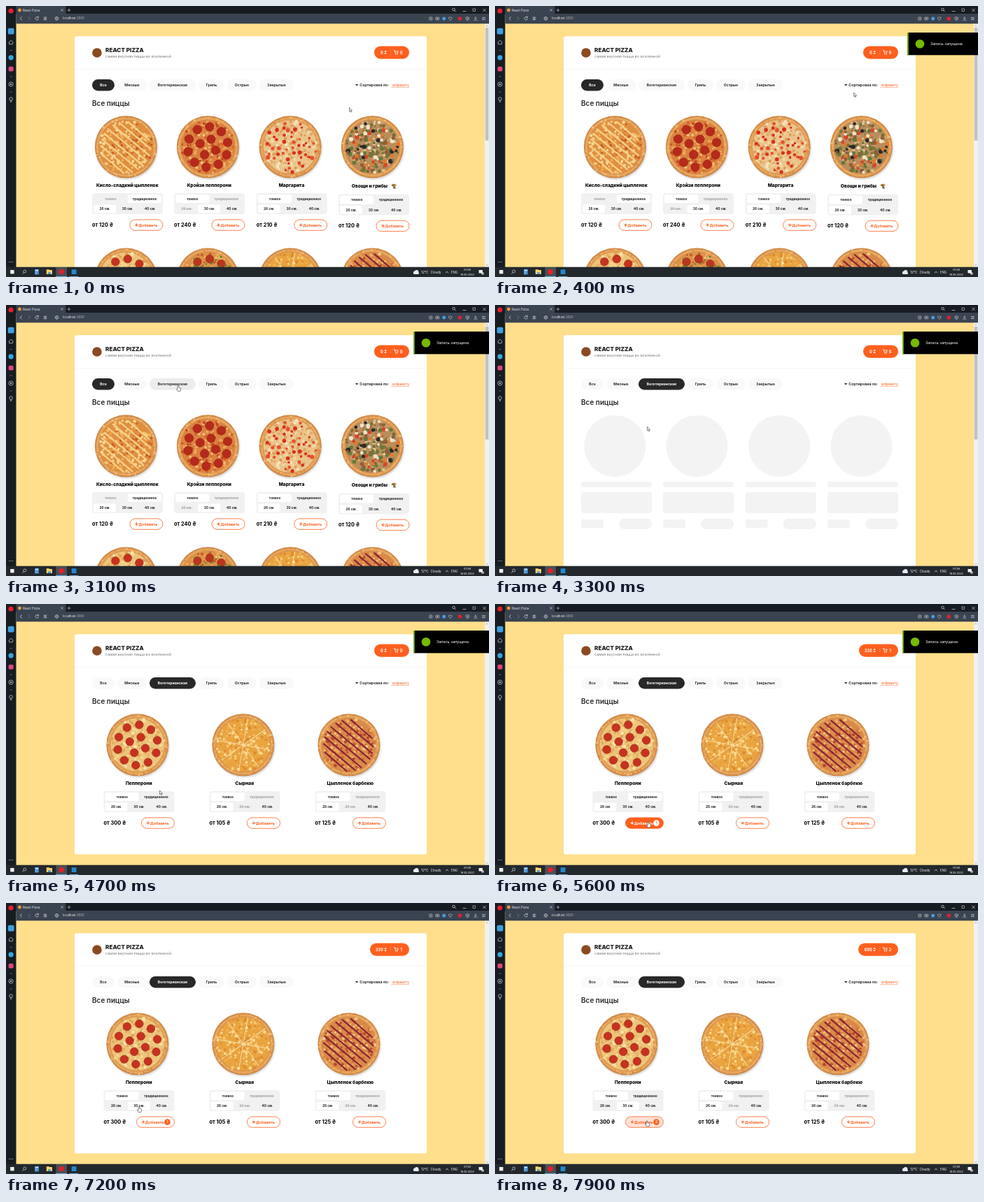
Recreate the animation shown at these times as an HTML page. Size 690 by 388 pixels, loop 8000 ms.

```html
<!DOCTYPE html>
<html lang="ru">
<head>
<meta charset="utf-8">
<title>React Pizza</title>
<style>
html, body { margin: 0; width: 100%; height: 100%; overflow: hidden; background: #ffdf8c; }
svg { display: block; width: 100vw; height: 100vh; }
text { font-family: Inter, "Open Sans", sans-serif; white-space: pre; }
</style>
</head>
<body>
<svg id="stage" viewBox="0 0 690 388">
  <defs>
    <radialGradient id="crust">
      <stop offset=".82" stop-color="#c9702c"/>
      <stop offset=".92" stop-color="#eaae66"/>
      <stop offset="1" stop-color="#c87a36"/>
    </radialGradient>
    <filter id="soft" x="-20%" y="-20%" width="140%" height="140%"><feGaussianBlur stdDeviation="1.6"/></filter>
  </defs>
  <rect width="690" height="388" fill="#ffdf8c"/>
  <g id="page"></g>
  <g id="chrome"></g>
  <g id="toast"></g>
  <g id="cursor" stroke="#222" stroke-width=".55" fill="#fff" stroke-linejoin="round">
    <path id="arrow" d="M0 0V5.6L1.3 4.5 2.2 6.5 3.1 6.1 2.2 4.1H4Z"/>
    <path id="hand" d="M-.8 .7Q0-.5 .8 .7V3L3.2 3.7Q4 4 3.8 5L3 8.4H-.6L-2.5 5.4Q-2.3 4.4-.8 5.3Z"/>
  </g>
</svg>
<script>
const LOOP = 8000, ORANGE = '#fe5f1e';
const $ = id => document.getElementById(id);

// ---- drawing helpers (text y is the optical middle) ----
const text = (s, x, y, size, weight = 700, fill = '#000', anchor = 'middle', extra = '') =>
  `<text x="${x}" y="${y + size * .36}" font-size="${size}" font-weight="${weight}" fill="${fill}" text-anchor="${anchor}" ${extra}>${s}</text>`;
const box = (x, y, w, h, r, fill, extra = '') =>
  `<rect x="${x}" y="${y}" width="${w}" height="${h}" rx="${r}" fill="${fill}" ${extra}/>`;
const dot = (x, y, r, fill, extra = '') => `<circle cx="${x}" cy="${y}" r="${r}" fill="${fill}" ${extra}/>`;
const line = (d, color, w = .8, extra = '') =>
  `<path d="${d}" fill="none" stroke="${color}" stroke-width="${w}" stroke-linecap="round" stroke-linejoin="round" ${extra}/>`;

function random(seed) {
  return () => (seed = (seed * 16807) % 2147483647) / 2147483647;
}

// ---- pizzas ----
const PIZZAS = {
  chicken: { base: '#e08f3e', flecks: ['#f3c476', '#c65e22', '#f0b052', '#f7d894'], stripes: '#f6d08c', angle: 38 },
  crazy: { base: '#dc8240', flecks: ['#f0bf78', '#c24a22', '#ecaa5c', '#d8602c'], salami: '#b52a1a', size: 6.3 },
  margarita: { base: '#eac48a', flecks: ['#f6e4bd', '#dd9a55', '#f2d5a0', '#e0a468'], bits: ['#d8301c', '#e4512f'], size: 2.6, count: 48 },
  veggie: { base: '#b98d5c', flecks: ['#8d713a', '#e0c795', '#6f6b35', '#cfa468'], bits: ['#2c2a2b', '#d8452a', '#efe3cb', '#66793a', '#e5782e', '#8e5f3a'], size: 2.8, count: 95 },
  pepperoni: { base: '#ecc47a', flecks: ['#f8e4ae', '#dfa052', '#f4d78c', '#e2ac62'], salami: '#c6321f', size: 5.8 },
  greens: { base: '#dc9248', flecks: ['#efc376', '#c55a2c', '#73863a', '#edb063'], salami: '#b9361f', size: 5.8, bits: ['#577a2d'], count: 24 },
  cheese: { base: '#e9a33f', flecks: ['#f6cb76', '#dc8a30', '#f8d992', '#efb253'], slices: '#f8dfa6' },
  barbecue: { base: '#d98a48', flecks: ['#f0c684', '#b8452f', '#e9aa60', '#cf6a38'], stripes: '#8a2434', angle: 38 }
};

function pizza(kind, cx, cy) {
  const p = PIZZAS[kind], rnd = random(kind.length * 911 + 17);
  const scatter = (n, inner, outer, size, colors) => Array.from({ length: n }, (_, i) => {
    const r = Math.sqrt(inner * inner + (outer * outer - inner * inner) * (i + .5) / n), a = i * 2.4 + rnd() * .6;
    return dot((Math.cos(a) * r).toFixed(1), (Math.sin(a) * r).toFixed(1),
      (size * (.6 + rnd() * .6)).toFixed(1), colors[Math.floor(rnd() * colors.length)]);
  }).join('');
  let s = dot(1.2, 2.2, 44, '#0003', 'filter="url(#soft)"') + dot(0, 0, 44.5, 'url(#crust)') +
    scatter(50, 40, 43, 1.4, ['#f0bd7c', '#d88c44', '#e6a45a']) + dot(0, 0, 38.5, p.base) +
    scatter(150, 0, 38, 2, p.flecks);
  if (p.salami) {
    for (let i = 0; i < 14; i++) {
      const inner = i < 4, a = (inner ? i / 4 : (i - 4) / 10) * Math.PI * 2 + .4, r = inner ? 12 : 29;
      s += dot((Math.cos(a) * r).toFixed(1), (Math.sin(a) * r).toFixed(1), p.size, p.salami, 'stroke="#9c2817" stroke-width=".6"');
    }
  }
  if (p.bits) s += scatter(p.count, 0, 37, p.salami ? 1.6 : p.size, p.bits);
  if (p.stripes) {
    let d = '';
    for (let y = -30; y <= 30; y += 8.5) {
      const half = Math.sqrt(36 * 36 - y * y);
      d += `M${-half} ${y}L${half} ${y + 2}`;
    }
    s += line(d, p.stripes, 2.2, `transform="rotate(${p.angle})"`);
  }
  if (p.slices) {
    for (let a = 10; a < 180; a += 45) s += line('M-38 0H38', p.slices, 1, `transform="rotate(${a})"`);
  }
  return `<g transform="translate(${cx} ${cy})">${s}</g>`;
}

// ---- product cards; option codes: a = active, n = normal, d = disabled ----
function options(labels, codes, x, y, step, size) {
  return labels.map((label, i) => {
    const cx = x + 2 + step * (i + .5), code = codes[i];
    return (code === 'a' ? box(x + 2 + i * step, y - 6, step - .5, 12, 2.5, '#fff') : '') +
      text(label, cx, y, size, 650, code === 'd' ? '#aaa' : '#222', 'middle', code === 'd' ? 'text-decoration="line-through"' : '');
  }).join('');
}

function addButton(right, y, count, look) {
  const w = count ? 54 : 47, x = right - w, full = look === 'full';
  const ink = full ? '#fff' : ORANGE;
  const fill = full ? ORANGE : look === 'fading' ? '#ffe2d6' : '#fff';
  return box(x, y - 7.7, w, 15.4, 7.7, fill, `stroke="${ORANGE}" stroke-width=".8"`) +
    line(`M${x + 7.5} ${y}h4M${x + 9.5} ${y - 2}v4`, ink, 1) +
    text('Добавить', x + 12.6, y, 5.4, 650, ink, 'start') +
    (count ? dot(right - 10, y, 4.3, full ? '#fff' : ORANGE) + text(count, right - 10, y, 4.8, 650, full ? ORANGE : '#fff') : '');
}

function card(x, title, kind, price, types, sizes, { dy = 0, count = 0, look = '' } = {}) {
  return pizza(kind, x + 48.4, 201.8) +
    text(title, x + 50.3, 256.6 + dy, 6.6, 800) +
    box(x, 268 + dy * 1.5, 101, 30, 4, '#f1f1f1') +
    options(['тонкое', 'традиционное'], types, x, 276 + dy * 1.5, 48.7, 4.7) +
    options(['26 см.', '30 см.', '40 см.'], sizes, x, 290.5 + dy * 1.5, 32.4, 4.8) +
    text(`от ${price} ₴`, x, 313.4 + dy * 1.3, 7.4, 700, '#000', 'start') +
    addButton(x + 101, 313.6 + dy * 1.3, count, look);
}

function skeleton(x) {
  const gray = '#f3f3f3';
  return dot(x + 48.4, 202, 44, gray) + box(x, 253, 101, 8, 3, gray) + box(x, 268, 101, 30, 4, gray) +
    box(x, 307, 32, 12, 3, gray) + box(x + 54, 305.5, 47, 15.6, 7.8, gray);
}

const mushroom = '<g transform="translate(554 258)"><path d="M-3.8-1.5Q-1-5 3.5-2.4L3 .2-1 0Z" fill="#c49a4a"/><path d="M-1 0L1.4 0 3 3.5-.4 3.4Z" fill="#6d6a35"/><path d="M-3-1L1-1.6" stroke="#43351c" stroke-width="1"/></g>';
const COLUMNS = [123, 240, 357.7, 475];

const SCENES = {
  all: () =>
    card(COLUMNS[0], 'Кисло-сладкий цыпленок', 'chicken', 120, 'da', 'ann') +
    card(COLUMNS[1], 'Крэйзи пепперони', 'crazy', 240, 'ad', 'dan') +
    card(COLUMNS[2], 'Маргарита', 'margarita', 210, 'an', 'ann') +
    card(COLUMNS[3], '', 'veggie', 120, 'an', 'ann', { dy: 1 }) +
    text('Овощи и грибы', 519.5, 257.8, 6.6, 800) + mushroom +
    ['pepperoni', 'greens', 'cheese', 'barbecue'].map((kind, i) => pizza(kind, COLUMNS[i] + 48.4, 391)).join(''),
  loading: () => COLUMNS.map(skeleton).join(''),
  veg: s =>
    card(139.5, 'Пепперони', 'pepperoni', 300, s.types, s.sizes, s) +
    card(290.5, 'Сырная', 'cheese', 105, 'ad', 'adn') +
    card(441.5, 'Цыпленок барбекю', 'barbecue', 125, 'ad', 'adn')
};

const CATEGORIES = [['Все', 123, 32], ['Мясные', 159, 42], ['Вегетерианская', 205, 66], ['Гриль', 275, 37], ['Острые', 316, 42], ['Закрытые', 362, 49]];

function drawPage(s) {
  const short = s.scene === 'veg';
  const cartLeft = s.total ? (s.total > 600 ? 519 : 520) : 526;
  return box(98, 43.3, 503, short ? 315.2 : 360, 3.6, '#fff') +
    dot(130, 67, 6.8, '#8a4a22') +
    text('REACT PIZZA', 142, 63, 8.2, 800, '#181818', 'start') +
    text('самая вкусная пицца во вселенной', 142, 72.2, 5.4, 400, '#7b7b7b', 'start') +
    box(cartLeft, 57.4, 576 - cartLeft, 18.4, 9.2, ORANGE) +
    text(`${s.total} ₴`, 544, 66.6, 5.5, 700, '#fff', 'end') +
    line('M549.5 63v7', '#ff8a58', .5) +
    line('M554 63.5h1.2l1.1 4.2h3.2l.7-2.8h-4.4', '#fff', .8) + dot(556.8, 69.2, .6, '#fff') + dot(559.2, 69.2, .6, '#fff') +
    text(s.count, 564.6, 66.6, 5.5, 700, '#fff') +
    line('M98 90.5H601', '#f4f4f4', .8) +
    CATEGORIES.map(([name, x, w], i) => {
      const on = i === s.category;
      return box(x, 105, w, 16.5, 8.25, on ? '#282828' : i === s.hover ? '#ececec' : '#f9f9f9') +
        text(name, x + w / 2, 113.2, 5.2, 700, on ? '#fff' : '#2c2c2c');
    }).join('') +
    '<path d="M499 112h4.4l-2.2 2.6Z" fill="#2c2c2c"/>' +
    text('Сортировка по:', 505.3, 113.2, 5.3, 650, '#2c2c2c', 'start') +
    text('алфавиту', 576, 113.2, 5.3, 400, ORANGE, 'end') +
    line('M551 116.7H576', ORANGE, .6, 'stroke-dasharray=".6 1.2"') +
    text('Все пиццы', 123, 139.7, 10, 600, '#282828', 'start') +
    SCENES[s.scene](s) +
    box(684, 25, 6, 349, 0, '#f1f1f1') + (short ? '' : box(684.7, 31, 4.6, 161.5, 0, '#c1c1c1')) +
    line('M686 28.8l1-1 1 1M686 370.5l1 1 1-1', '#777', .6);
}

function drawChrome() {
  const pale = '#d5d8de', dim = '#7b8492';
  const ring = (x, y, r) => dot(x, y, r, 'none', `stroke="${pale}" stroke-width=".7"`);
  return box(0, 0, 690, 12, 0, '#171c22') + box(0, 0, 14.5, 374, 0, '#171c22') +
    box(14.5, 0, 71, 12, 1, '#3a4350') + box(14.5, 11, 675.5, 14.3, 0, '#3a4350') +
    dot(7, 7, 3.6, '#e5202d') + dot(19.5, 6, 2.4, '#ef9a3a') +
    text('React Pizza', 24, 6, 4.4, 400, '#eef0f3', 'start') +
    line('M78.6 4.4l3 3M81.6 4.4l-3 3M88 6h4M90 4v4', pale, .6) +
    ring(639.5, 5, 1.8) + line('M641 6.4l1.4 1.5M653 7.5h4M681.5 4l4 4M685.5 4l-4 4', pale, .7) +
    box(667, 4, 3.4, 3.4, 0, 'none', `stroke="${pale}" stroke-width=".6"`) +
    line('M22.3 15.6l-2 2.2 2 2.2', pale) + line('M32.3 15.6l2 2.2-2 2.2', dim) +
    line('M46 16.2a2.3 2.3 0 1 0 .5 2.3M46.3 15v1.7h-1.7', pale, .7) +
    line('M54 16.2h4M54 17.9h4M54 19.6h4M56 16v4', pale, .6) +
    ring(72.5, 17.8, 2.3) + line('M70.2 17.8h4.6M72.5 15.5v4.6', pale, .4) +
    text('localhost<tspan fill="#b4bac4">:3000</tspan>', 81.3, 17.8, 4.3, 400, '#eef0f3', 'start') +
    box(604.8, 16, 4, 4, .6, 'none', `stroke="${pale}" stroke-width=".6"`) + line('M605.8 18h2', pale, .6) +
    box(613.8, 16.2, 5, 3.6, .6, 'none', `stroke="${pale}" stroke-width=".6"`) + dot(616.3, 18, .9, pale) +
    dot(625.7, 18, 2.5, '#459be0') +
    line('M634.7 20.2l-2.2-2.3a1.2 1.2 0 0 1 2.2-1.3 1.2 1.2 0 0 1 2.2 1.3Z', pale, .6) +
    dot(648.3, 18, 2.8, '#db2430') +
    line('M659.3 15.5l2.2 1.2v2.6l-2.2 1.2-2.2-1.2v-2.6ZM657.1 16.7l2.2 1.2 2.2-1.2M659.3 17.9v2.6', pale, .5) +
    line('M670.8 15.5v3M669.4 17.2l1.4 1.4 1.4-1.4M668.6 20.2h4.4M680.4 16.4h4M680.4 18h4M680.4 19.6h4', pale, .6) +
    // sidebar
    box(2.8, 31.8, 8.8, 8.8, 1.8, '#3d9fdf') +
    line('M4.4 51.7l2.8-2.5 2.8 2.5-.8 3H5.2Z', pale, .7) +
    line('M6 63.5h2.4M6 101h2.4M6 123h2.4', dim, .7) +
    dot(7.1, 73.8, 3.6, '#35a6de') + box(3.7, 86.7, 6.9, 6.9, 1.7, '#dc4778') +
    ring(7.1, 112, 3.1) + '<path d="M6.2 110.5l2.5 1.5-2.5 1.5Z" fill="#d5d8de"/>' +
    ring(7.1, 133, 2.3) + line('M6.2 136h1.8M6.5 137.4h1.2', pale, .7) +
    [4.8, 7.1, 9.4].map(x => dot(x, 366.5, .6, pale)).join('') +
    // taskbar
    box(0, 373.7, 690, 14.3, 0, '#23282c') + box(71.5, 374, 15.5, 14, 0, '#4a4f54') +
    line('M71.5 387.5h15.5M91 387.5h12', '#76b9ed', .9) +
    box(6.2, 378, 5.4, 5.4, 0, '#f2f2f2') +
    ring(26.8, 380, 2) + line('M25.3 381.6l-1.7 1.8', pale, .8) +
    box(41, 376.8, 6, 7.8, .6, '#3e87c5') + box(42, 377.8, 4, 1.6, 0, '#dcecf7') + line('M42.5 381h3M42.5 383h3', '#dcecf7', .8, 'stroke-dasharray=".2 1.4"') +
    box(57.8, 377, 4, 2, .5, '#e5a93a') + box(57.8, 378, 8.2, 6, .5, '#f8d36d') + box(60, 381.3, 4, 2.7, .3, '#4d9bd4') +
    dot(79.2, 380.6, 3.7, '#e5202d') + box(93.7, 377.3, 6.8, 6.8, .5, '#2488cf') +
    dot(584, 381.7, 2.1, '#e4edf5') + dot(586.6, 380.6, 2.7, '#e4edf5') + box(582, 381, 8, 3, 1.5, '#e4edf5') +
    text('12°C', 593, 381, 4.8, 400, '#fff', 'start') + text('Cloudy', 606.5, 381, 4.5, 400, '#fff', 'start') +
    line('M628.3 382l1.7-1.8 1.7 1.8', '#fff', .7) +
    text('ENG', 640.6, 381, 4.3, 400, '#fff') +
    text('01:59', 659, 378, 4, 400, '#fff') + text('16.05.2022', 659, 384.4, 3.8, 400, '#fff') +
    box(675.5, 378, 5.4, 4.4, .4, '#f3f3f3') + dot(681, 383, 1.8, '#f3f3f3') + text('2', 681, 383, 2.6, 600, '#222');
}

const drawToast = () => box(582, 38, 108, 32.3, 0, '#000') + box(582, 38, 1.8, 32.3, 0, '#76b900') +
  dot(600, 54.2, 6.3, '#76b900') + text('Запись запущена', 615, 54.2, 5.4, 400, '#fff', 'start');

// ---- timeline ----
const STEPS = [
  { at: 0, scene: 'all', category: 0, hover: -1, types: 'an', sizes: 'ann', count: 0, total: 0, look: '' },
  { at: 3100, hover: 2 },
  { at: 3200, category: 2, scene: 'loading' },
  { at: 3400, scene: 'veg' },
  { at: 5000, types: 'na' },
  { at: 5400, look: 'full' },
  { at: 5500, count: 1, total: 330 },
  { at: 6100, look: '' },
  { at: 6300, sizes: 'nan' },
  { at: 6700, types: 'an' },
  { at: 7500, look: 'full' },
  { at: 7700, count: 2, total: 690 },
  { at: 7900, look: 'fading' }
];
const PATH = [
  [0, 490.5, 145.5], [100, 490.5, 145.5], [900, 560, 78], [1000, 560, 78], [1300, 444.2, 149], [1700, 347, 165],
  [1900, 340, 160], [2500, 219, 113], [2700, 219, 113], [2800, 246, 115], [3200, 246, 115],
  [3400, 190, 232], [3600, 182, 250], [3700, 176, 262], [4000, 176, 262], [4700, 219.6, 267],
  [4900, 219.6, 267], [5000, 221, 273], [5200, 221, 273], [5450, 219, 311.5], [6000, 219, 311.5],
  [6250, 190.3, 289], [6450, 190.3, 289], [6700, 163, 273], [7000, 175, 280], [7500, 217, 311.5], [8000, 217, 311.5]
];

const clamp = v => Math.max(0, Math.min(1, v));
const smooth = v => v * v * (3 - 2 * v);

function pointer(t) {
  const i = PATH.findIndex(p => p[0] > t), [t0, x0, y0] = PATH[i - 1], [t1, x1, y1] = PATH[i];
  const k = smooth((t - t0) / (t1 - t0));
  return [x0 + (x1 - x0) * k, y0 + (y1 - y0) * k];
}

function clickable(x, y, scene) {
  const within = (l, t, r, b) => x >= l && x <= r && y >= t && y <= b;
  return within(205, 105, 271, 121.5) || within(526, 57, 576, 75) ||
    scene === 'veg' && (within(140, 268, 240, 298) || within(186, 305.5, 240, 321));
}

let shown = -1;
function render(t) {
  const past = STEPS.filter(s => s.at <= t), state = Object.assign({}, ...past);
  if (past.length !== shown) {
    shown = past.length;
    $('page').innerHTML = drawPage(state);
  }
  const slideIn = 1 - (1 - clamp((t - 100) / 500)) ** 3, slideOut = clamp((t - 6050) / 300) ** 2;
  $('toast').setAttribute('transform', `translate(${110 * (1 - slideIn + slideOut)} 0)`);
  const [x, y] = pointer(t), hand = clickable(x, y, state.scene);
  $('cursor').setAttribute('transform', `translate(${x} ${y})`);
  $('hand').style.display = hand ? '' : 'none';
  $('arrow').style.display = hand ? 'none' : '';
}

$('chrome').innerHTML = drawChrome();
$('toast').innerHTML = drawToast();
render(0);
const start = performance.now();
(function tick() {
  render((performance.now() - start) % LOOP);
  requestAnimationFrame(tick);
})();
</script>
</body>
</html>
```
